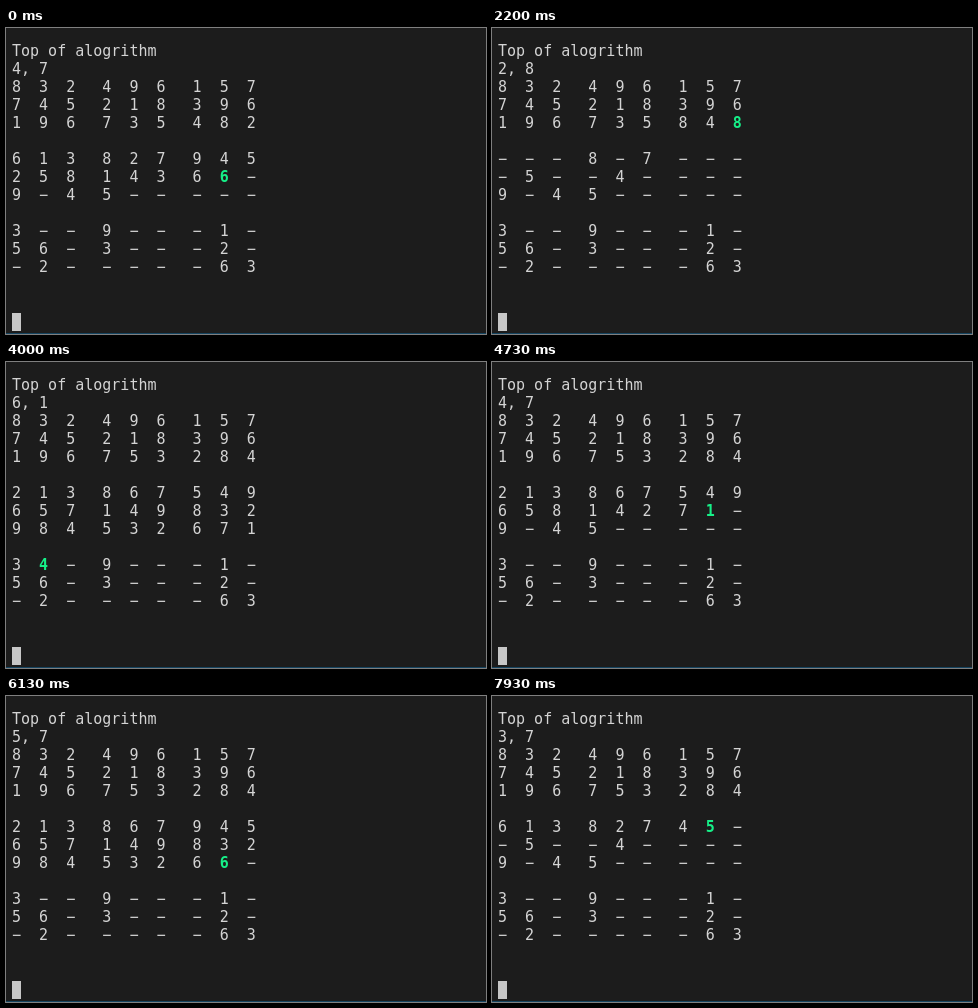
Write an HTML page that moves like this. It is 480 by 306 pixels and loops after 8 s.

```html
<!DOCTYPE html>
<html lang="en">
<head>
<meta charset="utf-8">
<title>Backtracking sudoku solver</title>
<style>
  html, body { margin: 0; width: 100%; height: 100%; overflow: hidden; background: #1c1c1c; }
  pre {
    position: absolute; left: 6px; top: 14px; margin: 0;
    font: 15px/18px "DejaVu Sans Mono", monospace; color: #d4d4d4;
  }
  b { color: #16f088; }
  #cursor { position: absolute; left: 6px; top: 285px; width: 9px; height: 18px; background: #c7c7c7; }
  #edge { position: absolute; left: 0; top: 305px; width: 100%; height: 1px; background: #14435f; }
</style>
</head>
<body>
<pre id="screen"></pre>
<div id="cursor"></div>
<div id="edge"></div>
<script>
const LOOP = 8000, FPS = 15;
const START = [
  '832496157', '745218396', '1967-----',
  '---8-7---', '-5--4----', '9-45-----',
  '3--9---1-', '56-3---2-', '-2-----63',
].join('');

// Milestones of the search: [tick, digits from the third row up to the tried cell].
const MILESTONES = [
  [0, '196735482' + '613827945' + '25814366'],
  [20, '196735489'],
  [33, '196735848'],
  [49, '196753284' + '2138671'],
  [71, '196753284' + '213867549' + '65814271'],
  [92, '196753284' + '213867945' + '657149832' + '98453266'],
  [119, '196753284' + '61382745'],
];

const rowOf = i => Math.floor(i / 9);
const colOf = i => i % 9;
const boxOf = i => Math.floor(rowOf(i) / 3) * 3 + Math.floor(colOf(i) / 3);

// Depth-first search that records every attempted digit, up to the last milestone.
function recordSearch() {
  const grid = [...START];
  const attempts = [];
  const lastKey = MILESTONES[MILESTONES.length - 1][1];

  const fits = cell => grid.every((digit, i) => i === cell || digit !== grid[cell] ||
    (rowOf(i) !== rowOf(cell) && colOf(i) !== colOf(cell) && boxOf(i) !== boxOf(cell)));

  function search(from) {
    const cell = grid.indexOf('-', from);
    if (cell < 0) return false;
    for (let digit = 1; digit <= 9; digit++) {
      grid[cell] = String(digit);
      const text = grid.join('');
      const key = text.slice(18, cell + 1);
      attempts.push({ cell, text, key });
      if (key === lastKey || (fits(cell) && search(cell + 1))) return true;
    }
    grid[cell] = '-';
    return false;
  }

  search(0);
  return attempts;
}

const attempts = recordSearch();
const anchors = MILESTONES.map(([tick, key]) =>
  ({ tick, index: attempts.findIndex(a => a.key === key) }));

function attemptAt(tick) {
  const next = Math.max(1, anchors.findIndex(a => a.tick >= tick));
  const a = anchors[next - 1], b = anchors[next];
  const progress = (tick - a.tick) / (b.tick - a.tick);
  return attempts[Math.round(a.index + (b.index - a.index) * progress)];
}

function render({ cell, text }) {
  let out = `Top of alogrithm\n${rowOf(cell)}, ${colOf(cell)}\n`;
  [...text].forEach((char, i) => {
    const shown = char === '-' ? '\u2212' : char;
    out += i === cell ? `<b>${shown}</b>` : shown;
    if (colOf(i) === 8) out += i % 27 === 26 ? '\n\n' : '\n';
    else out += i % 3 === 2 ? '   ' : '  ';
  });
  return out;
}

const screen = document.getElementById('screen');
const origin = performance.now();
let shownTick = -1;

function draw() {
  const time = (performance.now() - origin) % LOOP;
  // Ticks fall on the nearest hundredth of a second.
  const tick = Math.floor((Math.floor(time / 10) * 10 + 5) * FPS / 1000);
  if (tick !== shownTick) {
    screen.innerHTML = render(attemptAt(tick));
    shownTick = tick;
  }
  requestAnimationFrame(draw);
}
draw();
</script>
</body>
</html>
```
